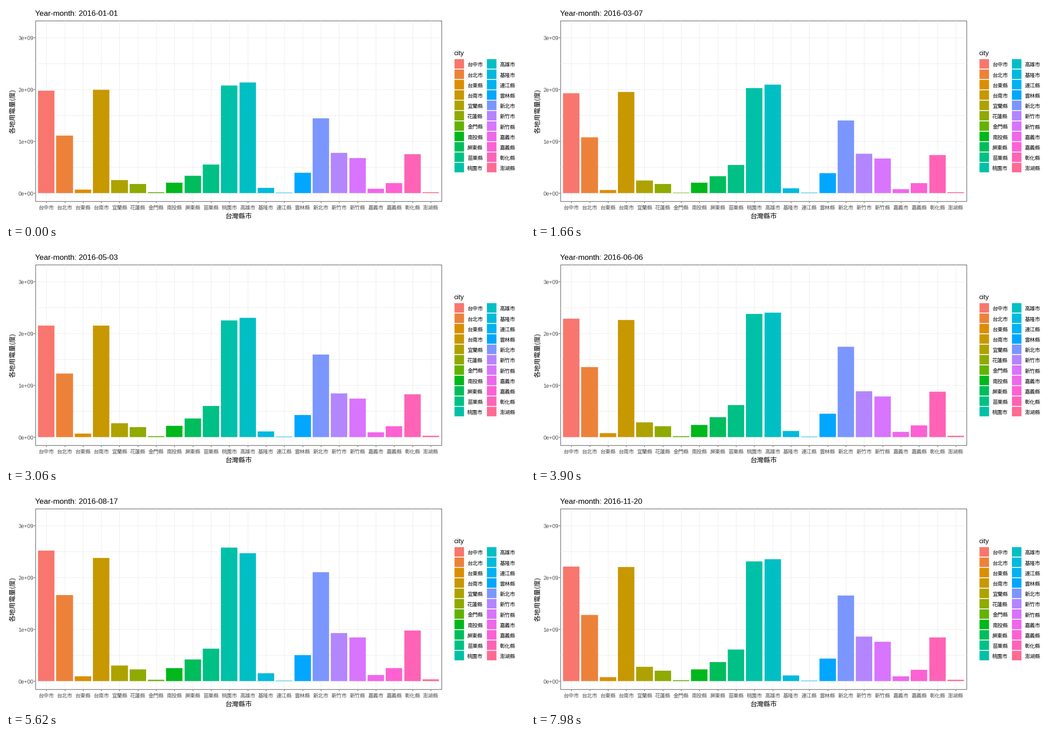
Recreate the animation shown at these times as a matplotlib script. Size 1159x483 px, loop 8 s.

```python
import matplotlib.pyplot as plt
import numpy as np
from matplotlib.animation import FuncAnimation
from matplotlib.patches import Rectangle

W, H, DPI = 1159, 483, 128
CW, CH = 1200, 500           # layout canvas, shrunk smoothly onto the stage
PX = W / CW * 72 / DPI       # points per canvas pixel
LATIN, CJK = "Liberation Sans", "Noto Sans CJK JP"

LEFT, RIGHT, TOP, BOTTOM = 68.5, 1007.5, 34.5, 452.5
BASE = 433                   # bottom edge of the bars
UNIT = 120                   # height of 1e9
PITCH = 42.32
BAR_X, BAR_W = 74.15, 0.9 * PITCH

# January and August consumption, in units of 1e7
CITIES = {
    "台中市": (197.2, 251.6), "台北市": (110.6, 165.8), "台東縣": (6.3, 8.9),
    "台南市": (199, 237.8), "宜蘭縣": (24.8, 30.4), "花蓮縣": (17.9, 22.2),
    "金門縣": (1.3, 2.6), "南投縣": (20.1, 24.8), "屏東縣": (33, 41.6),
    "苗栗縣": (55.4, 62.8), "桃園市": (207.2, 257.2), "高雄市": (213.2, 246.8),
    "基隆市": (9.7, 14.9), "連江縣": (0.6, 0.8), "雲林縣": (39, 50.3),
    "新北市": (143.8, 210.2), "新竹市": (77.8, 92.9), "新竹縣": (67.9, 84.3),
    "嘉義市": (8, 11.5), "嘉義縣": (19.2, 24.8), "彰化縣": (75.3, 97.2),
    "澎湖縣": (2, 3.7),
}
JAN, AUG = np.array(list(CITIES.values())).T

# Shared seasons: industry scales the January level, heat adds the summer rise
DAYS = [0, 43, 94, 157, 229, 280, 324]
INDUSTRY = [0, -0.068, 0.05, 0.08, 0, 0.06, 0.08]
HEAT = [0, 0, -0.07, 0.28, 1, 0.56, 0.14]


def hcl(hue, chroma=100, lum=65):
    """Polar LUV colour converted to clipped sRGB."""
    a = np.radians(hue)
    u = chroma * np.cos(a) / (13 * lum) + 0.1978398
    v = chroma * np.sin(a) / (13 * lum) + 0.4683363
    y = ((lum + 16) / 116) ** 3
    x = 9 * y * u / (4 * v)
    z = -x / 3 - 5 * y + 3 * y / v
    m = np.array([[3.240479, -1.537150, -0.498535],
                  [-0.969256, 1.875992, 0.041556],
                  [0.055648, -0.204043, 1.057311]])
    rgb = np.clip(m @ [x, y, z], 0, 1)
    curve = np.where(rgb <= 0.00304, 12.92 * rgb, 1.055 * rgb ** (1 / 2.4) - 0.055)
    return tuple(np.clip(curve, 0, 1))


COLORS = [hcl(15 + 360 * i / len(CITIES)) for i in range(len(CITIES))]


def stage(fig):
    ax = fig.add_axes([0, 0, 1, 1])
    ax.set(xlim=(0, CW), ylim=(CH, 0))
    ax.axis("off")
    return ax


def text(ax, x, y, s, px, font=LATIN, color="black", **kw):
    return ax.text(x, y, s, fontsize=px * PX, family=font, color=color,
                   va="baseline", **kw)


def line(ax, xs, ys, color):
    ax.plot(xs, ys, color=color, lw=PX, solid_capstyle="butt", snap=False)


def block(ax, x, y, w, h, color):
    return ax.add_patch(Rectangle((x, y), w, h, fc=color, lw=0, snap=False))


def draw_panel(ax):
    for k in range(7):
        y = BASE + 0.5 - UNIT * k / 2
        line(ax, [LEFT, RIGHT], [y, y], "#ebebeb")
        if k % 2 == 0:
            line(ax, [64, 68], [y, y], "#333333")
            text(ax, 63.2, y + 5, f"{k // 2}e+{9 if k else 0:02d}", 12.4,
                 color="#4d4d4d", ha="right")
    for i, city in enumerate(CITIES):
        mid = BAR_X + BAR_W / 2 + PITCH * i
        x = round(mid) + 0.5
        line(ax, [x, x], [TOP, BOTTOM], "#ebebeb")
        line(ax, [x, x], [453, 456], "#333333")
        text(ax, mid, 471, city, 12.1, CJK, "#4d4d4d", ha="center")
    ax.add_patch(Rectangle((LEFT, TOP), RIGHT - LEFT, BOTTOM - TOP,
                           fill=False, ec="#333333", lw=PX, snap=False))
    text(ax, 537.4, 491.6, "台灣縣市", 15.6, CJK, ha="center")
    text(ax, 20.9, 243.3, "各地用電量(度)", 15.4, CJK, ha="center",
         rotation=90, rotation_mode="anchor")


def draw_legend(ax):
    text(ax, 1035.9, 113.9, "city", 15.2)
    for i, city in enumerate(CITIES):
        col, row = divmod(i, 11)
        block(ax, 1037 + 75 * col, 123 + 24 * row, 22, 22, COLORS[i])
        text(ax, 1066.5 + 75.2 * col, 140.1 + 24 * row, city, 12.1, CJK)


fig = plt.figure(figsize=(W / DPI, H / DPI), dpi=DPI, facecolor="white")

# Rasterise everything that never moves once, then reuse it as the backdrop
base = stage(fig)
draw_panel(base)
draw_legend(base)
fig.canvas.draw()
backdrop = np.array(fig.canvas.buffer_rgba())
base.remove()
fig.figimage(backdrop, zorder=-1)

ax = stage(fig)
title = text(ax, 67.8, 22.8, "", 17.8)
bars = []
for i, color in enumerate(COLORS):
    x0 = round(BAR_X + PITCH * i)
    x1 = round(BAR_X + BAR_W + PITCH * i)
    bars.append(block(ax, x0, BASE, x1 - x0, 0, color))


def update(frame):
    # Steps are held for 20, 100 and 20 ms in turn
    cycle, tick = divmod(frame, 7)
    step = 3 * cycle + (tick >= 1) + (tick >= 6)
    day = step * 1705 / 899
    title.set_text(f"Year-month: {np.datetime64('2016-01-01') + int(day)}")

    level = 1 + np.interp(day, DAYS, INDUSTRY)
    use = JAN * level + (AUG - JAN) * np.interp(day, DAYS, HEAT)
    for bar, h in zip(bars, np.round(use * UNIT / 100)):
        bar.set_y(BASE - h)
        bar.set_height(h)
    return [title, *bars]


anim = FuncAnimation(fig, update, frames=400, interval=20, repeat=True, repeat_delay=0)
plt.show()
```
